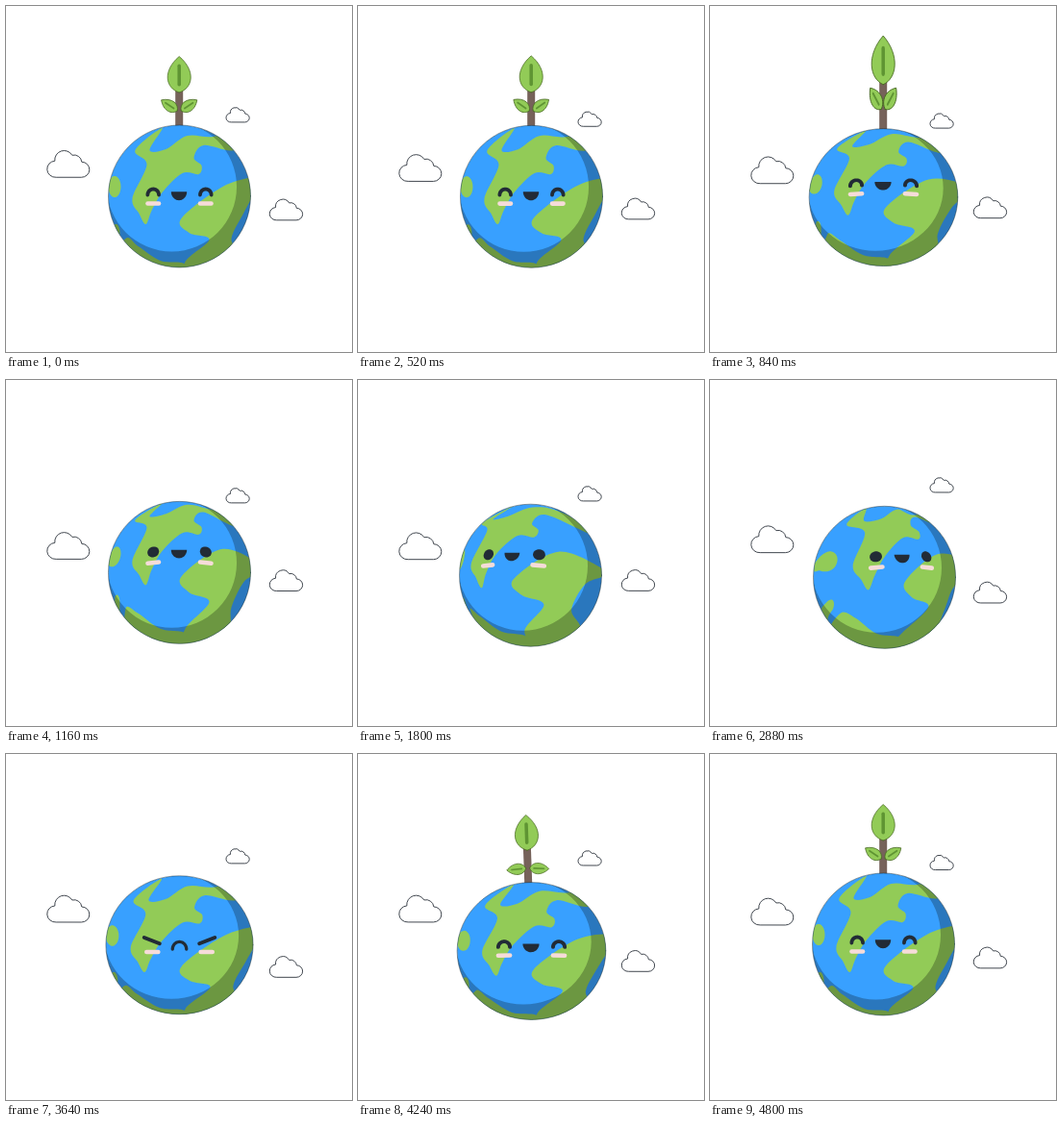
Animation, 360 px wide and 360 px high, one loop 4840 ms. Source, as an HTML page with a canvas:

```html
<!DOCTYPE html>
<html lang="en">
<head>
<meta charset="utf-8">
<title>Planet and sprout</title>
<style>
html, body { margin: 0; width: 100%; height: 100%; overflow: hidden; background: #fff; }
canvas { display: block; width: 360px; height: 360px; }
</style>
</head>
<body>
<canvas id="stage" width="360" height="360"></canvas>
<script>
const c = document.getElementById('stage').getContext('2d');
const LOOP = 4840, R = 74, TAU = Math.PI * 2;
const BLUE = '#38a0ff', GREEN = '#92cb57', DARK_GREEN = '#5f9433', INK = '#222b36', STEM = '#76625a';

// Eased step from 0 to 1, and a smooth bump of height 1.
const ramp = (t, from, to) => (1 - Math.cos(Math.PI * Math.min(1, Math.max(0, (t - from) / (to - from))))) / 2;
const bump = (t, mid, reach) => ramp(t, mid - reach, mid) - ramp(t, mid, mid + reach);

function arc(x, y, rx, ry, from = 0, to = TAU) {
  return Array.from({ length: 25 }, (_, i) => {
    const a = from + (to - from) * i / 24;
    return [x + rx * Math.cos(a), y + ry * Math.sin(a)];
  });
}

// Shores around the planet's centre; points outside the disc lie on the far side.
const NORTH = [[-18, -71], [-46, -48], [-34, -33], [-49, 2], [-42, 18], [-35, 29], [-29, 15], [-18, -4],
  [3, -24], [20, -23], [23, -32], [15, -40], [25, -53], [57, -48], [70, -70], [35, -62], [8, -63], [-14, -49], [-31, -48]];
const SOUTH = [[82, -20], [45, -10], [2, 23], [10, 38], [31, 45], [6, 68], [8, 87], [60, 64], [54, 44], [67, 17], [80, -8]];
const POLE = [[-56, 44], [-43, 52], [-20, 67], [6, 71], [0, 94], [-70, 74]];
const LANDS = [NORTH, SOUTH, POLE, arc(-67.5, -10, 6.5, 11), arc(-66, 38, 4, 9)];

const CLOUD = new Path2D('M9 28A8.5 8.5 0 0 1 8 11A9.7 9.7 0 0 1 26 5A8 8 0 0 1 36 12A8 8 0 0 1 36 28Z');

// Turns a point on the sphere; far-side points unfold outside the disc.
function turner(yaw, pitch) {
  const cy = Math.cos(yaw), sy = Math.sin(yaw), cp = Math.cos(pitch), sp = Math.sin(pitch);
  return ([px, py]) => {
    const r = Math.hypot(px, py) / R || 1e-6, front = r <= 1;
    const rho = front ? r : 2 - r, k = rho / r / R;
    const x = px * k, y = py * k, z = Math.sqrt(1 - rho * rho) * (front ? 1 : -1);
    const y1 = y * cp - z * sp, z1 = z * cp + y * sp;
    const x1 = x * cy + z1 * sy, z2 = z1 * cy - x * sy;
    const q = Math.hypot(x1, y1) || 1e-6, out = z2 >= 0 ? R : R * (2 - q) / q;
    return [x1 * out, y1 * out];
  };
}

function smoothLoop(pts) {
  const n = pts.length, at = i => pts[(i + n) % n];
  c.beginPath();
  c.moveTo(...pts[0]);
  for (let i = 0; i < n; i++) {
    const [a, b, d, e] = [at(i - 1), at(i), at(i + 1), at(i + 2)];
    c.bezierCurveTo(b[0] + (d[0] - a[0]) / 6, b[1] + (d[1] - a[1]) / 6,
      d[0] - (e[0] - b[0]) / 6, d[1] - (e[1] - b[1]) / 6, d[0], d[1]);
  }
}

function polyline(pts) {
  c.beginPath();
  pts.forEach(p => c.lineTo(...p));
}

function line(pts, width, color) {
  polyline(pts);
  c.lineWidth = width;
  c.strokeStyle = color;
  c.stroke();
}

function fill(pts, color) {
  polyline(pts);
  c.fillStyle = color;
  c.fill();
}

function disc(x, y, r) {
  c.beginPath();
  c.arc(x, y, r, 0, TAU);
}

function leaf(length, width) {
  c.beginPath();
  c.moveTo(0, 0);
  c.bezierCurveTo(length * .12, -width * .66, length * .6, -width * .8, length, 0);
  c.bezierCurveTo(length * .6, width * .8, length * .12, width * .66, 0, 0);
  c.fillStyle = GREEN;
  c.fill();
  c.lineWidth = .7;
  c.strokeStyle = '#43631f';
  c.stroke();
  line([[length * .22, 0], [length * .74, 0]], width * .16, DARK_GREEN);
}

// The sprout stretches and shoots off, then springs up again.
function plant(t, x, base) {
  const leaving = t < 1120;
  if (!leaving && t < 3990) return;
  const stretch = leaving ? 1 + .44 * ramp(t, 460, 1000) : ramp(t, 3980, 4280) + .46 * bump(t, 4370, 150);
  const angle = leaving ? -34 - 21 * ramp(t, 460, 840) : -34 + 38 * bump(t, 4240, 200) - 16 * bump(t, 4400, 130);
  const sway = -3 * bump(t, 4240, 260);
  c.save();
  c.translate(x - .3 + sway, base - 230 * (leaving ? ramp(t, 840, 1100) : 0));
  c.rotate(sway * .012);
  c.scale(1, stretch);
  c.fillStyle = STEM;
  c.fillRect(-4, -38, 8, 42);
  for (const side of [-1, 1]) {
    c.save();
    c.scale(side, 1);
    c.translate(2, -15);
    c.rotate(angle * Math.PI / 180);
    leaf(20, 10.5);
    c.restore();
  }
  c.translate(0, -34);
  c.rotate(-Math.PI / 2);
  leaf(37.5, 22);
  c.restore();
}

function face(t, turn) {
  const mood = t < 1040 || t >= 3980 ? 'happy' : t < 3320 ? 'seek' : 'strain';
  const map = pts => pts.map(turn);
  for (const s of [-1, 1]) {
    line(map([[s * 21.5, 7.5], [s * 33, 7.5]]), 4.6, '#f6dcd9');
    if (mood === 'happy') line(map(arc(s * 27.3, -1.5, 5.8, 6, Math.PI)), 3.8, INK);
    else if (mood === 'seek') fill(map(arc(s * 27.3, -4, 6, 5.8)), INK);
    else line(map([[s * 20, -1.5], [s * 35.5, -8]]), 3.8, INK);
  }
  if (mood === 'strain') line(map(arc(0, 4.5, 7, 8, Math.PI)), 3.2, INK);
  else fill(map(arc(-.5, -4.8, 8.2, 9, 0, Math.PI)), INK);
}

function planet(t) {
  const yaw = .27 * (2 * ramp(t, 2100, 2600) - ramp(t, 1200, 1600) - ramp(t, 3100, 3450));
  const pitch = .26 * (ramp(t, 480, 1100) - ramp(t, 3100, 3450)) + .04 * bump(t, 4240, 260);
  const squash = .045 * (bump(t, 840, 340) + bump(t, 4240, 180)) + .035 * bump(t, 3640, 240)
    - .02 * (bump(t, 1000, 140) + bump(t, 4400, 150)) - .03 * bump(t, 3900, 260);
  const sx = 1 + squash, sy = 1 - squash * .77;
  const x = 180.5 + yaw * 3.7;
  const y = 198 + 7.3 * (ramp(t, 200, 2700) - ramp(t, 3200, 3760))
    + 21 * bump(t, 3900, 260) + 7 * bump(t, 4240, 200) - 4 * bump(t, 4400, 150);
  const turn = turner(yaw, pitch);

  plant(t, x, y - R * sy);
  c.save();
  c.translate(x, y);
  c.scale(sx, sy);
  c.save();
  disc(0, 0, R);
  c.clip();
  c.fillStyle = BLUE;
  c.fill();
  c.fillStyle = GREEN;
  for (const land of LANDS) {
    smoothLoop(land.map(turn));
    c.fill();
  }
  c.beginPath();
  c.rect(-2 * R, -2 * R, 4 * R, 4 * R);
  c.arc(-8, -10, 67.5, 0, TAU);
  c.fillStyle = 'rgba(0,0,0,.26)';
  c.fill('evenodd');
  c.restore();
  disc(0, 0, R);
  c.lineWidth = .7;
  c.strokeStyle = 'rgba(20,45,60,.7)';
  c.stroke();
  face(t, turn);
  c.restore();
}

function cloud(x, y, scale) {
  c.save();
  c.translate(x, y);
  c.scale(scale, scale);
  c.lineWidth = .9 / scale;
  c.strokeStyle = '#2c333b';
  c.stroke(CLOUD);
  c.restore();
}

function draw(now) {
  const t = now % LOOP;
  const wave = delay => Math.sin((t - delay) / LOOP * TAU);
  c.clearRect(0, 0, 360, 360);
  c.lineCap = c.lineJoin = 'round';
  cloud(42.8, 152.8 + 6.3 * wave(320), 1);
  cloud(229, 105.5 + 7 * wave(0), .55);
  cloud(274.3, 201 - 4 * ramp(t, 0, 1600) + 15 * ramp(t, 1600, 3260) - 11 * ramp(t, 3260, LOOP), .78);
  planet(t);
  requestAnimationFrame(draw);
}
requestAnimationFrame(draw);
</script>
</body>
</html>
```
